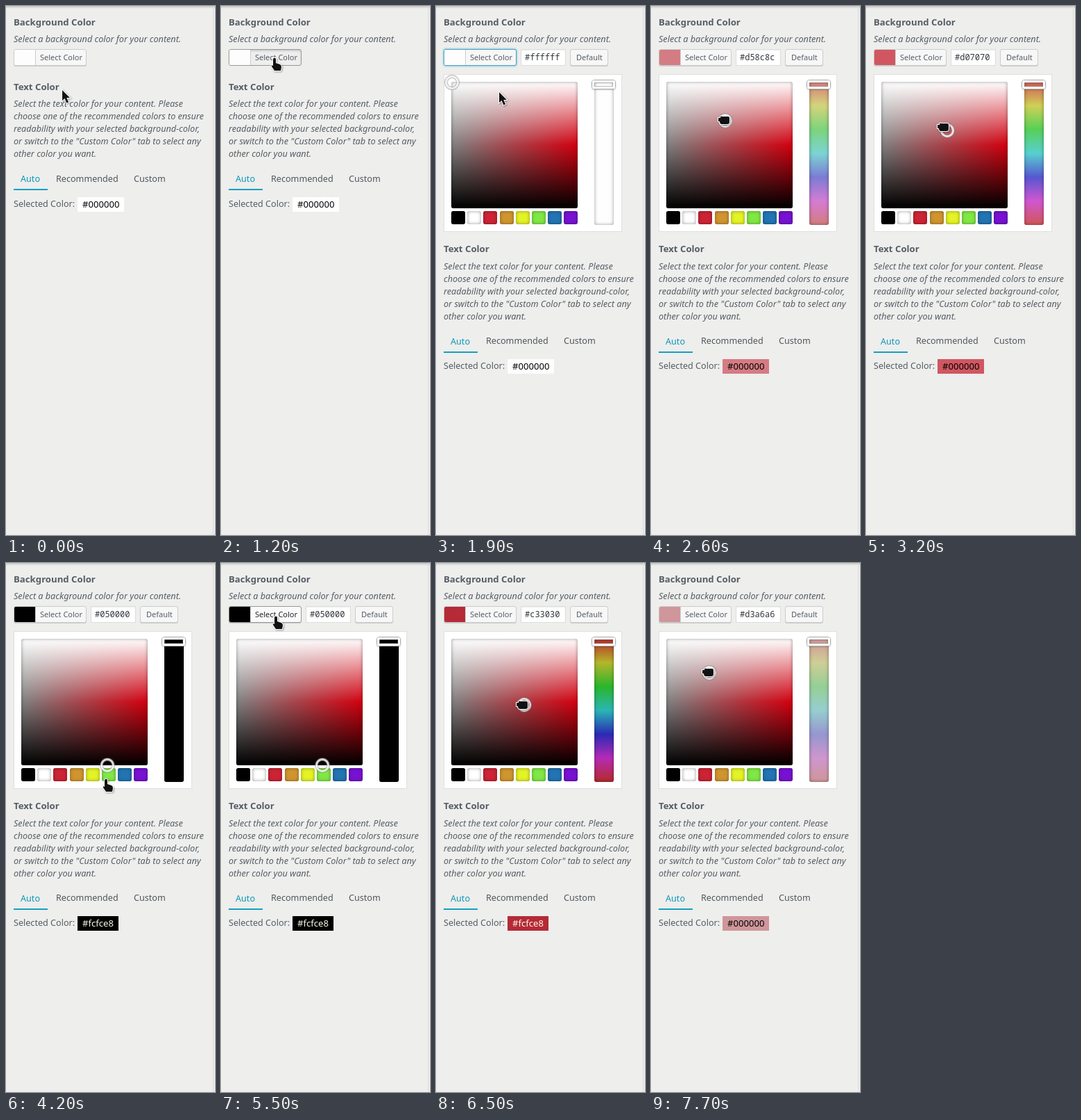
Write an HTML page that moves like this. It is 301 px wide and 761 px high and loops after 8 s.

```html
<!DOCTYPE html>
<html lang="en">
<head>
<meta charset="utf-8">
<title>Color settings</title>
<style>
  html, body { margin: 0; width: 100%; height: 100%; overflow: hidden; background: #eeeeec; }
  body { position: relative; font: 12.6px/18px "Noto Sans", "Open Sans", sans-serif; color: #555d66; }
  body * { position: absolute; box-sizing: border-box; white-space: nowrap; }
  br { position: static; }
  .top { left: 0; top: 0; width: 100%; height: 4px; background: linear-gradient(#c4c4c4, #eeeeec); }
  .edge { left: 298px; top: 0; width: 1px; height: 100%; background: #dadada; }
  .title { left: 11px; font-size: 13.2px; font-weight: bold; }
  .note { left: 11px; font-style: italic; }
  .button { top: 62px; height: 24px; line-height: 21px; font-size: 11px; background: #f7f7f7;
    border: 1px solid #ccc; border-radius: 3px; box-shadow: 0 1px 0 #ccc; }
  #select { left: 11px; width: 105px; }
  #select.hover { border-color: #999; color: #23282d; background: #fafafa; }
  #select.press { border-color: #999; background: #eee; box-shadow: inset 0 2px 5px -3px rgba(0,0,0,.5); }
  #select.focus { border-color: #4aa3cc; box-shadow: 0 0 3px rgba(30,145,190,.8); }
  #swatch { left: 0; top: 0; width: 31px; height: 22px; border-right: 1px solid #ccc; border-radius: 2px 0 0 2px; }
  #value { left: 122px; top: 62px; width: 65px; height: 24px; padding-left: 5px; background: #fff; color: #32373c;
    border: 1px solid #ddd; box-shadow: inset 0 1px 2px rgba(0,0,0,.07); font: 12px/22px "Noto Sans Mono", monospace; }
  .panel { left: 11px; top: 98px; width: 257px; height: 227px; background: #fff; border: 1px solid #dfdfdf; }
  .inset { border-radius: 3px; }
  .inset::after { content: ""; position: absolute; inset: 0; border-radius: 3px; box-shadow: inset 0 0 5px rgba(0,0,0,.4); }
  .square { left: 22px; top: 109px; width: 182px; height: 182px;
    background: linear-gradient(#fff, rgba(255,255,255,0) 50%, rgba(0,0,0,0) 50%, #000),
      linear-gradient(90deg, #808080, #d2000f); }
  #strip { left: 228px; top: 109px; width: 28px; height: 206px; }
  .handle { left: 224px; top: 106px; width: 35px; height: 14px; border: 1px solid #aaa; border-radius: 4px;
    box-shadow: 0 1px 2px rgba(0,0,0,.2); }
  .handle::after { content: ""; position: absolute; inset: 0; border: 3px solid #fff; border-radius: 3px;
    box-shadow: inset 0 0 0 1px rgba(128,128,128,.5); }
  #marker { left: -11px; top: -11px; width: 22px; height: 22px; border: 5px solid rgba(128,128,128,.5); border-radius: 50%; }
  #marker::after { content: ""; position: absolute; inset: -4px; border: 3px solid rgba(255,255,255,.8); border-radius: 50%; }
  #lower { left: 0; top: 0; }
  #lower.moved { top: 233.4px; }
  .tab { top: 240px; color: #50575e; }
  .active { left: 11px; top: 240.2px; width: 49px; height: 25px; padding-left: 10px; color: #0c97ba; border-bottom: 2px solid #12a0c4; }
  #chip { left: 103px; top: 275px; padding: 0 7px; font-size: 13.1px; line-height: 21px; }
  #picker { left: 0; top: 0; }
  #cursor { left: 0; top: 0; overflow: visible; stroke: #fff; stroke-width: 2; paint-order: stroke; fill: #111;
    filter: drop-shadow(1px 1px 1px rgba(0,0,0,.35)); }
</style>
</head>
<body>
<div class="top"></div>
<div class="edge"></div>
<div class="title" style="top:14px">Background Color</div>
<div class="note" style="top:39px">Select a background color for your content.</div>
<div class="button" id="select"><div id="swatch"></div><span style="left:37px">Select Color</span></div>

<div id="picker">
  <div id="value"></div>
  <div class="button" style="left:193px;width:55px;padding-left:8px">Default</div>
  <div class="panel"></div>
  <div class="square inset"></div>
  <div id="strip" class="inset"></div>
  <div class="handle"></div>
  <div id="swatches"></div>
  <div id="marker"></div>
</div>

<div id="lower">
  <div class="title" style="top:107px">Text Color</div>
  <div class="note" style="top:132.3px">Select the text color for your content. Please<br>choose one of the recommended colors to ensure<br>readability with your selected background-color,<br>or switch to the "Custom Color" tab to select any<br>other color you want.</div>
  <div class="tab active">Auto</div>
  <div class="tab" style="left:72px">Recommended</div>
  <div class="tab" style="left:184px">Custom</div>
  <div style="left:11px;top:276px">Selected Color:</div>
  <div id="chip"></div>
</div>
<svg id="cursor" width="20" height="20"><path id="shape"/></svg>

<script>
const LOOP = 8000, STEP = 100, OPEN_AT = 1500;
const SIZE = 182, LEFT = 22, TOP = 109;
const $ = id => document.getElementById(id);

const shapes = {
  arrow: 'M0 1v15l3.5-3 2.8 6.5 2.8-1.2-2.8-6.2h4.7z',
  hand: 'M-2 1q2-3 4 0v6l6 2q2 1 2 4l-1 5h-9l-4-6q-1-3 2-1z',
  fist: 'M0 3h3v-2q1-1 2 0h9q2 0 2 3v5q0 3-3 3h-8q-3 0-3-4h-2z'
};

// time, x, y, kind, glide to the next entry
const cursorTrack = [
  [0, 81, 120, 'arrow'], [800, 79, 79, 'hand'], [1000, 77, 75, 'hand'],
  [1500, 79, 83, 'arrow', true], [2300, 103, 163, 'arrow'],
  [2600, 97, 158, 'fist'], [2900, 99, 161, 'fist'], [3100, 101, 165, 'fist'],
  [3200, 103, 168, 'fist', true], [3700, 130, 255, 'fist'], [3900, 136, 280, 'fist'], [4000, 139, 309, 'fist'],
  [4200, 144, 311, 'hand'], [4500, 150, 300, 'hand'], [4600, 191, 300, 'arrow'],
  [4900, 187, 311, 'arrow', true], [5300, 78, 85, 'arrow'],
  [5500, 79, 77, 'hand'], [5800, 77, 77, 'hand'], [6000, 100, 199, 'arrow'], [6200, 117, 199, 'arrow'],
  [6400, 113, 196, 'fist'], [6500, 116, 198, 'fist'],
  [7200, 95, 190, 'arrow', true], [7400, 41, 160, 'arrow'], [7700, 74, 151, 'fist']
];

// time, x, y, fixed color (otherwise taken from the position), glide
const pickTrack = [
  [0, 23, 110, '#ffffff'], [2600, 107, 165], [2900, 110, 169], [3100, 114, 175],
  [3200, 117, 179, '#d07070'], [3300, 121, 193, '', true], [3700, 140, 262], [3900, 143, 281],
  [4000, 146, 291, '#050000'], [6400, 124, 200], [6500, 127, 204, '#c33030'], [7700, 84, 158, '#d3a6a6']
];

const buttonTrack = [
  [0, ''], [800, 'hover'], [1200, 'press'], [1500, 'focus'], [2600, ''], [5500, 'hover'], [6000, '']
];

function sample(track, t) {
  const i = track.findLastIndex(k => k[0] <= t);
  const [start, x, y, tag, glide] = track[i];
  if (!glide) return { x, y, tag };
  const [end, nx, ny] = track[i + 1];
  const p = (t - start) / (end - start);
  return { x: x + (nx - x) * p, y: y + (ny - y) * p, tag };
}

function redHex(s, l) {
  const half = (1 - Math.abs(2 * l - 1)) * s / 2;
  const byte = v => Math.round(v * 255).toString(16).padStart(2, '0');
  return '#' + byte(l + half) + byte(l - half).repeat(2);
}

// slightly deeper than the nominal color, leaving black and white alone
function tone(h, s, l) {
  return `hsl(${h}, ${s * 108}%, ${(l - .16 * l * (1 - l)) * 100}%)`;
}

function move(el, x, y) {
  el.style.transform = `translate(${x}px, ${y}px)`;
}

['#000', '#fff', '#cc2435', '#d1952f', '#e4f325', '#80e844', '#2274b3', '#7811d2'].forEach((color, i) => {
  const box = document.createElement('div');
  box.className = 'inset';
  box.style.cssText = `left:${LEFT + i * 23.2}px;top:295px;width:20px;height:19px;background:${color}`;
  $('swatches').append(box);
});

function draw(now) {
  const t = Math.floor(now % LOOP / STEP) * STEP;
  const open = t >= OPEN_AT;
  const pick = sample(pickTrack, t), cursor = sample(cursorTrack, t);
  const s = (pick.x - LEFT) / SIZE, l = 1 - (pick.y - TOP) / SIZE;
  const color = tone(355, s, l);

  $('picker').style.display = open ? '' : 'none';
  $('lower').className = open ? 'moved' : '';
  $('select').className = 'button ' + buttonTrack.findLast(k => k[0] <= t)[1];
  $('swatch').style.background = color;
  $('value').textContent = pick.tag || redHex(s, l);

  const hues = [0, 60, 120, 180, 240, 300, 360].map(h => tone(h, s, l));
  $('strip').style.background = `linear-gradient(${hues})`;
  move($('marker'), pick.x, pick.y);

  const ink = l < .5 ? '#fcfce8' : '#000000';
  Object.assign($('chip').style, { background: open ? color : '#fff', color: ink });
  $('chip').textContent = ink;

  $('shape').setAttribute('d', shapes[cursor.tag]);
  move($('cursor'), cursor.x, cursor.y);
}

const began = performance.now();
function tick() {
  draw(performance.now() - began);
  requestAnimationFrame(tick);
}
tick();
</script>
</body>
</html>
```
